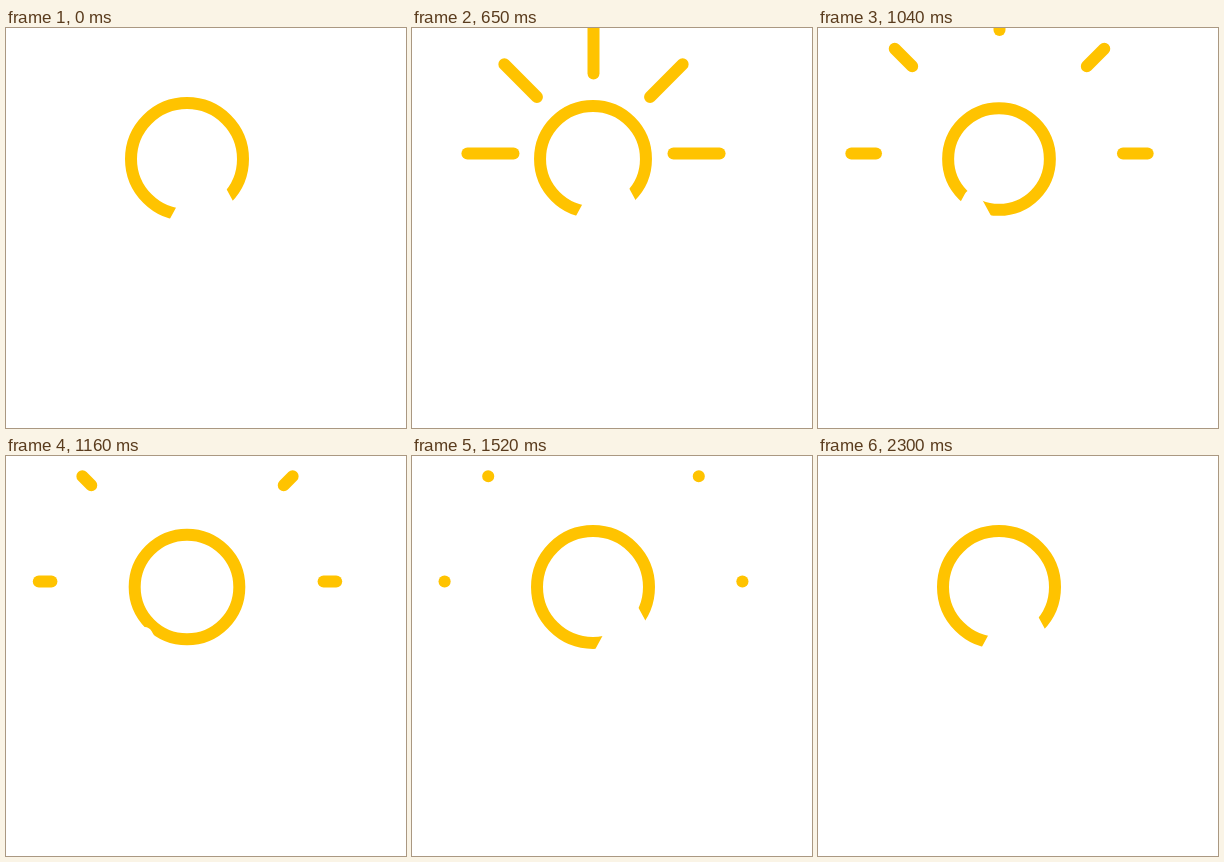
Recreate the animation shown at these times as an HTML page with a canvas. Size 400 px wide and 400 px high, loop 2330 ms.

```html
<!DOCTYPE html>
<html lang="en">
<head>
<meta charset="utf-8">
<title>Sun behind moving mountains</title>
<style>
  html, body { margin: 0; width: 100%; height: 100%; overflow: hidden; background: #fff; }
  canvas { display: block; width: 400px; height: 400px; }
</style>
</head>
<body>
<canvas id="stage" width="400" height="400"></canvas>
<script>
const ctx = document.getElementById('stage').getContext('2d');
const LOOP = 2330, START = 530, STEP = 30;
const YELLOW = '#ffc300';

const clamp = v => Math.min(1, Math.max(0, v));
const span = (t, from, to) => clamp((t - from) / (to - from));
const smooth = u => u * u * (3 - 2 * u);

// Cubic bezier easing with control points (x1, 0) and (x2, 1)
function ease(u, x1, x2) {
  let lo = 0, hi = 1;
  for (let i = 0; i < 24; i++) {
    const s = (lo + hi) / 2, r = 1 - s;
    const x = 3 * x1 * s * r * r + 3 * x2 * s * s * r + s * s * s;
    if (x < u) lo = s; else hi = s;
  }
  return smooth(lo);
}

function drawRing(t) {
  const shrink = Math.sin(span(t, START, 885) * Math.PI / 2);
  const grow = smooth(span(t, 885, 1535));
  ctx.beginPath();
  ctx.arc(181, 131, 56 - 6 * shrink + 6 * grow, 0, Math.PI * 2);
  ctx.stroke();
}

function drawRays(t) {
  if (t < START || t >= 1580) return;
  const head = 80 + 69 * (1 - Math.exp(-(t - 520) / 118));
  const tail = Math.min(head, 80 + 69 * ease(span(t, 825, 1580), 0.13, 0.1));
  for (let i = 0; i < 5; i++) {
    const angle = Math.PI * (1 + i / 4);
    const dx = Math.cos(angle), dy = Math.sin(angle);
    ctx.beginPath();
    ctx.moveTo(181.5 + dx * tail, 125.5 + dy * tail);
    ctx.lineTo(181.5 + dx * head, 125.5 + dy * head);
    ctx.stroke();
  }
}

function drawMountain(x, y) {
  const height = 200, half = height * 0.545;
  ctx.beginPath();
  ctx.moveTo(x - half, y + height);
  ctx.arcTo(x, y, x + half, y + height, 8);
  ctx.lineTo(x + half, y + height);
  ctx.fill();
}

function draw(t) {
  ctx.fillStyle = '#fff';
  ctx.fillRect(0, 0, 400, 400);
  ctx.strokeStyle = YELLOW;
  ctx.lineWidth = 12;
  ctx.lineCap = 'round';
  drawRing(t);
  drawRays(t);

  // The front peak leaves to the left while the next one takes its place
  const p = ease(span(t, 525, LOOP), 0.3, 0.2), q = 1 - p;
  drawMountain(200.3 - 106 * p, 124 + 66 * p);
  drawMountain(200.3 + 103 * q, 124 + 58 * q);
}

const begin = performance.now();
function tick() {
  const t = (performance.now() - begin) % LOOP;
  draw(t < START ? 0 : START + Math.floor((t - START) / STEP) * STEP);
  requestAnimationFrame(tick);
}
tick();
</script>
</body>
</html>
```
